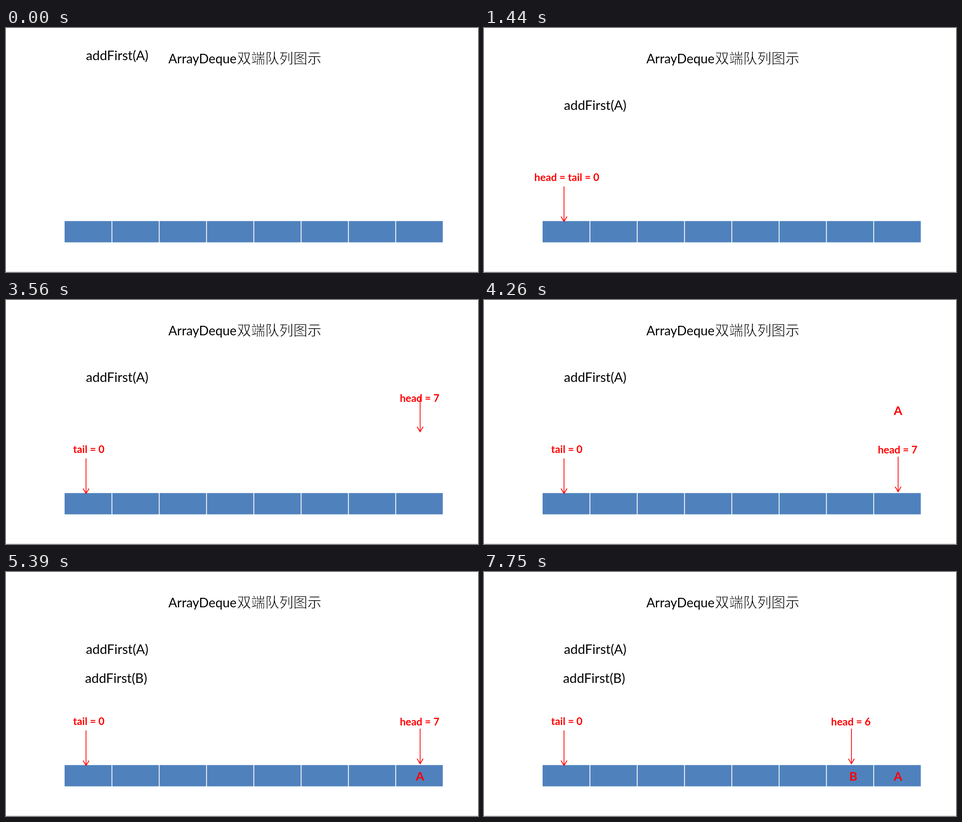
Animation, 1039 px wide and 539 px high, one loop 8000 ms. Source, as an HTML page:

```html
<!DOCTYPE html>
<html lang="zh">
<head>
<meta charset="utf-8">
<title>ArrayDeque</title>
<style>
  html, body { margin: 0; width: 100%; height: 100%; overflow: hidden; background: #fff; }
  svg { display: block; width: 1039px; height: 539px; }
  text { font-family: Carlito, Lato, sans-serif; font-family: Lato, sans-serif; }
  .call { font-size: 28.8px; }
  /* The white outline thins the strokes of the glyphs. */
  .cjk { font: 300 31px "Noto Sans CJK SC", "Noto Sans CJK", sans-serif; stroke: #fff; stroke-width: .8px; }
  .label, .item { font-weight: 700; fill: #f00; text-anchor: middle; }
  .label { font-size: 22.8px; }
  .item { font-size: 27px; }
  .arrow { fill: none; stroke: #f00; stroke-width: 1.7; }
</style>
</head>
<body>
<svg id="stage" viewBox="0 0 1039 539">
  <rect y="538" width="1039" height="1" fill="#d2d2d2"/>
  <text x="357.6" y="77.5" font-size="28.2">ArrayDeque</text>
  <text class="cjk" x="508.5" y="77.5">双端队列图示</text>
</svg>
<script>
const LOOP = 8000;
const stage = document.getElementById('stage');
const actors = [];

function add(tag, attrs, content = '') {
  const node = document.createElementNS('http://www.w3.org/2000/svg', tag);
  for (const name in attrs) node.setAttribute(name, attrs[name]);
  node.textContent = content;
  stage.append(node);
  return node;
}

// Linear drop from above the stage, sampled at discrete steps; settles at `end`.
function flight(start, end, steps, from, { duration = 625, step = (end - start) / (steps - 1) } = {}) {
  const progress = t => t >= end ? 1
    : Math.min(1, from + Math.min(steps - 2, Math.floor((t - start) / step)) * step / duration);
  return { start, progress };
}

function actor(node, { start, progress }, distance, hide = LOOP, show = start) {
  actors.push({ node, progress, distance, show, hide });
}

const text = (cls, x, y, content) => add('text', { class: cls, x, y }, content);
const arrow = (x, tip) => add('path', {
  class: 'arrow',
  d: `M${x} ${tip - 78}V${tip}M${x - 6.5} ${tip - 11.5}L${x} ${tip - .5}L${x + 6.5} ${tip - 11.5}`
});

add('rect', { x: 129, y: 426.5, width: 832.5, height: 47, fill: '#4f81bd' });
for (let i = 1; i < 8; i++)
  add('rect', { x: 128.2 + 104.1 * i, y: 426, width: 1.8, height: 48, fill: '#fff' });

const callA = flight(-4, 660, 10, .433, { duration: 1170 });
const tail = flight(810, 1440, 9, .065);
const head7 = flight(3160, 3800, 9, .065, { step: 78 });
const itemA = flight(3960, 4600, 9, .082, { step: 75 });
const callB = flight(4830, 5390, 8, .1, { step: 78 });
const head6 = flight(6320, 6870, 8, .103, { step: 78 });
const itemB = flight(7100, 7750, 9, .08, { step: 78 });

actor(text('call', 176, 181, 'addFirst(A)'), callA, 194);
actor(text('call', 174, 245, 'addFirst(B)'), callB, 258);

actor(text('label', 182.3, 337.5, 'head = tail = 0'), tail, 364, 2210);
actor(text('label', 182.3, 337.5, 'tail = 0'), tail, 364, LOOP, 3000);
actor(arrow(176.2, 428), tail, 430);

actor(text('label', 910.5, 338.5, 'head = 7'), head7, 364, 6160);
actor(arrow(911.6, 424), head7, 426, 6160);
actor(text('label', 807.6, 338.5, 'head = 6'), head6, 364);
actor(arrow(808.8, 424), head6, 426);

actor(text('item', 911.3, 461, 'A'), itemA, 473);
actor(text('item', 813, 461, 'B'), itemB, 473);

function draw(now) {
  const t = now % LOOP;
  for (const { node, progress, distance, show, hide } of actors) {
    const visible = t >= show && t < hide;
    node.setAttribute('visibility', visible ? 'visible' : 'hidden');
    if (visible) node.setAttribute('transform', `translate(0 ${-distance * (1 - progress(t))})`);
  }
}

let origin;
function tick(now) {
  origin ??= now;
  draw(now - origin);
  requestAnimationFrame(tick);
}
draw(0);
requestAnimationFrame(tick);
</script>
</body>
</html>
```
